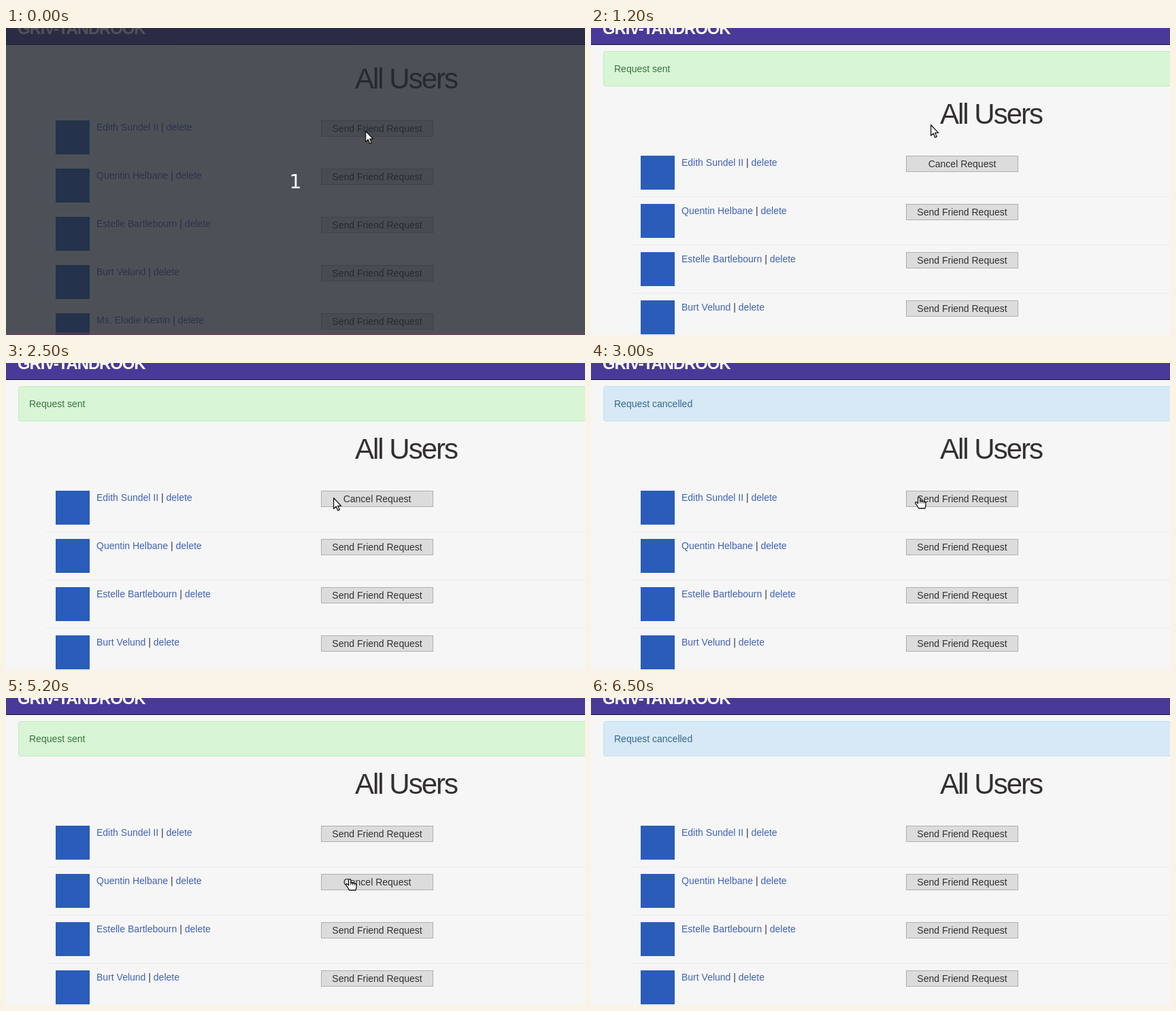
An HTML page for the animation above (6800 ms loop, 851 px wide and 452 px high).

```html
<!DOCTYPE html>
<html lang="en">
<head>
<meta charset="utf-8">
<title>All Users</title>
<style>
  html, body { margin: 0; width: 100%; height: 100%; overflow: hidden; }
  body { background: #f6f6f6; font: 14px/20px "Liberation Sans", Arial, sans-serif; color: #332f33; }
  #stage { position: relative; width: 851px; height: 452px; overflow: hidden; background: #f6f6f6; }
  #stage *, #stage { box-sizing: border-box; }

  header { position: absolute; z-index: 1; inset: 0 0 auto; height: 25px; overflow: hidden;
    background: #493a99; border-bottom: 1px solid #15102c; }
  .logo { position: absolute; left: 17px; top: -13px; font-size: 23.8px; line-height: 27px;
    font-weight: bold; letter-spacing: -1px; color: #fff; white-space: nowrap; }

  .alert { position: absolute; left: 18px; top: 34px; width: 900px; height: 52px; padding: 15px;
    border: 1px solid; border-radius: 4px; }
  .sent { background: #d8f5d6; border-color: #c5ebbb; color: #3c763d; }
  .gone { background: #d7e9f6; border-color: #bfe3ef; color: #35698f; }

  h1 { position: absolute; left: 513px; top: 54px; margin: 0; font-size: 42px; line-height: 42px;
    font-weight: normal; letter-spacing: -2px; white-space: nowrap; }
  ul { position: absolute; left: 58px; top: 126px; width: 860px; margin: 0; padding: 0; list-style: none; }
  li { position: relative; height: 71px; border-bottom: 1px solid #ebebeb; white-space: nowrap; }
  .avatar { position: absolute; left: 15px; top: 10px; width: 50px; height: 50px; background: #2a5db9; }
  .who { position: absolute; left: 75px; top: 10px; }
  a { color: #3f62b6; }
  .btn { position: absolute; left: 405px; top: 10px; width: 165px; height: 24px;
    border: 1px solid #b0b0b0; background: #dcdcdc; text-align: center; line-height: 22px; }
  .btn span { position: absolute; inset: 0; }
  .cancel { opacity: 0; }

  #dim { position: absolute; z-index: 2; inset: 0; background: rgba(35, 40, 48, .8); }
  #dim::after { content: ""; position: absolute; inset: auto 0 0; height: 4px; background: rgba(110, 65, 90, .5); }
  #dim b { position: absolute; left: 0; width: 100%; top: 210px; text-align: center;
    font: 28px/33px "DejaVu Sans", sans-serif; color: #fff; }

  #cursor { position: absolute; z-index: 3; left: 0; top: 0; width: 1px; height: 1px; overflow: visible; }
  #cursor path { fill: #fff; stroke: #111; stroke-width: 1.3; stroke-linejoin: round; }
  #cursor .lines { fill: none; stroke-width: 1; }

  /* every change is a hard cut on one shared 6.8 s clock */
  #dim, .page, .alert, .btn, .btn span, #cursor, #cursor g { animation: 6.8s step-end infinite; }
  #dim { animation-name: dim; }
  .page { animation-name: push; }
  .sent { animation-name: sent; }
  .gone { animation-name: gone; }
  li:nth-child(1) .send { animation-name: send1; }
  li:nth-child(1) .cancel { animation-name: cancel1; }
  li:nth-child(2) .send { animation-name: send2; }
  li:nth-child(2) .cancel { animation-name: cancel2; }
  li:nth-child(2) .btn { animation-name: press; }
  #cursor { animation-name: move; }
  #cursor .hand { animation-name: hand; }
  #cursor .arrow { animation-name: arrow; }

  @keyframes dim { 0% { opacity: 1 } 4.41%, 100% { opacity: 0 } }
  @keyframes push { 0% { transform: none } 17.64%, 100% { transform: translateY(52px) } }
  @keyframes sent { 0%, 44.11%, 80.88%, 100% { opacity: 0 } 17.64%, 57.35% { opacity: 1 } }
  @keyframes gone { 0%, 57.35% { opacity: 0 } 44.11%, 80.88%, 100% { opacity: 1 } }
  @keyframes send1 { 0%, 44.11%, 100% { opacity: 1 } 17.64% { opacity: 0 } }
  @keyframes cancel1 { 0%, 44.11%, 100% { opacity: 0 } 17.64% { opacity: 1 } }
  @keyframes send2 { 0%, 80.88%, 100% { opacity: 1 } 57.35% { opacity: 0 } }
  @keyframes cancel2 { 0%, 80.88%, 100% { opacity: 0 } 57.35% { opacity: 1 } }
  @keyframes press {
    0%, 76.46%, 100% { background: #dcdcdc; box-shadow: none }
    74.99% { background: #d0d0d0; box-shadow: 0 0 0 1px #c4c4c4 }
  }
  @keyframes hand {
    0%, 10.29%, 36.76%, 47.05%, 52.94%, 91.17%, 100% { opacity: 0 }
    5.88%, 29.41%, 44.11%, 49.99%, 58.82% { opacity: 1 }
  }
  @keyframes arrow {
    0%, 10.29%, 36.76%, 47.05%, 52.94%, 91.17% { opacity: 1 }
    5.88%, 29.41%, 44.11%, 49.99%, 58.82%, 95.58%, 100% { opacity: 0 }
  }
  @keyframes move {
    0% { transform: translate(528px, 151px) }
    5.88% { transform: translate(520px, 150px) }
    7.35% { transform: translate(508px, 146px) }
    8.82% { transform: translate(499px, 142px) }
    26.47% { transform: translate(496px, 155px) }
    27.94% { transform: translate(487px, 180px) }
    29.41% { transform: translate(481px, 198px) }
    47.05% { transform: translate(486px, 222px) }
    48.52% { transform: translate(472px, 248px) }
    49.99% { transform: translate(464px, 267px) }
    52.94% { transform: translate(470px, 269px) }
    58.82% { transform: translate(469px, 272px) }
    63.23% { transform: translate(482px, 277px) }
    64.7% { transform: translate(517px, 280px) }
    66.17% { transform: translate(510px, 272px) }
    67.64% { transform: translate(504px, 267px) }
    91.17% { transform: translate(350px, 160px) }
    92.64%, 100% { transform: translate(206px, 60px) }
  }
</style>
</head>
<body>
<div id="stage">
  <header><div class="logo">GRIV-TANDROOK</div></header>
  <div class="alert sent">Request sent</div>
  <div class="alert gone">Request cancelled</div>
  <div class="page">
    <h1>All Users</h1>
    <ul id="users"></ul>
  </div>
  <div id="dim"><b>1</b></div>
  <svg id="cursor">
    <g class="arrow">
      <path d="M.6 .8V16.6L4.2 13.2L6.7 19.2L9.2 18.1L6.7 12.4H11.6Z"/>
    </g>
    <g class="hand" transform="translate(-5 -1)">
      <path d="M4.6 10V2.2a1.6 1.6 0 0 1 3.2 0V6L13.3 6.8Q16 7.2 16 9.5V13Q15.5 15 14.8 17H5.8Q4 14 .9 9.6Q.4 8 1.8 7.7Q3 7.7 4.6 10Z"/>
      <path class="lines" d="M7.8 6V9.5M10.5 7V9.5M13.2 7.4V9.8"/>
    </g>
  </svg>
</div>
<script>
  const names = ["Edith Sundel II", "Quentin Helbane", "Estelle Bartlebourn", "Burt Velund", "Ms. Elodie Kestin"];
  document.getElementById("users").innerHTML = names.map(name => `
    <li>
      <div class="avatar"></div>
      <div class="who"><a>${name}</a> | <a>delete</a></div>
      <div class="btn"><span class="send">Send Friend Request</span><span class="cancel">Cancel Request</span></div>
    </li>`).join("");
</script>
</body>
</html>
```
